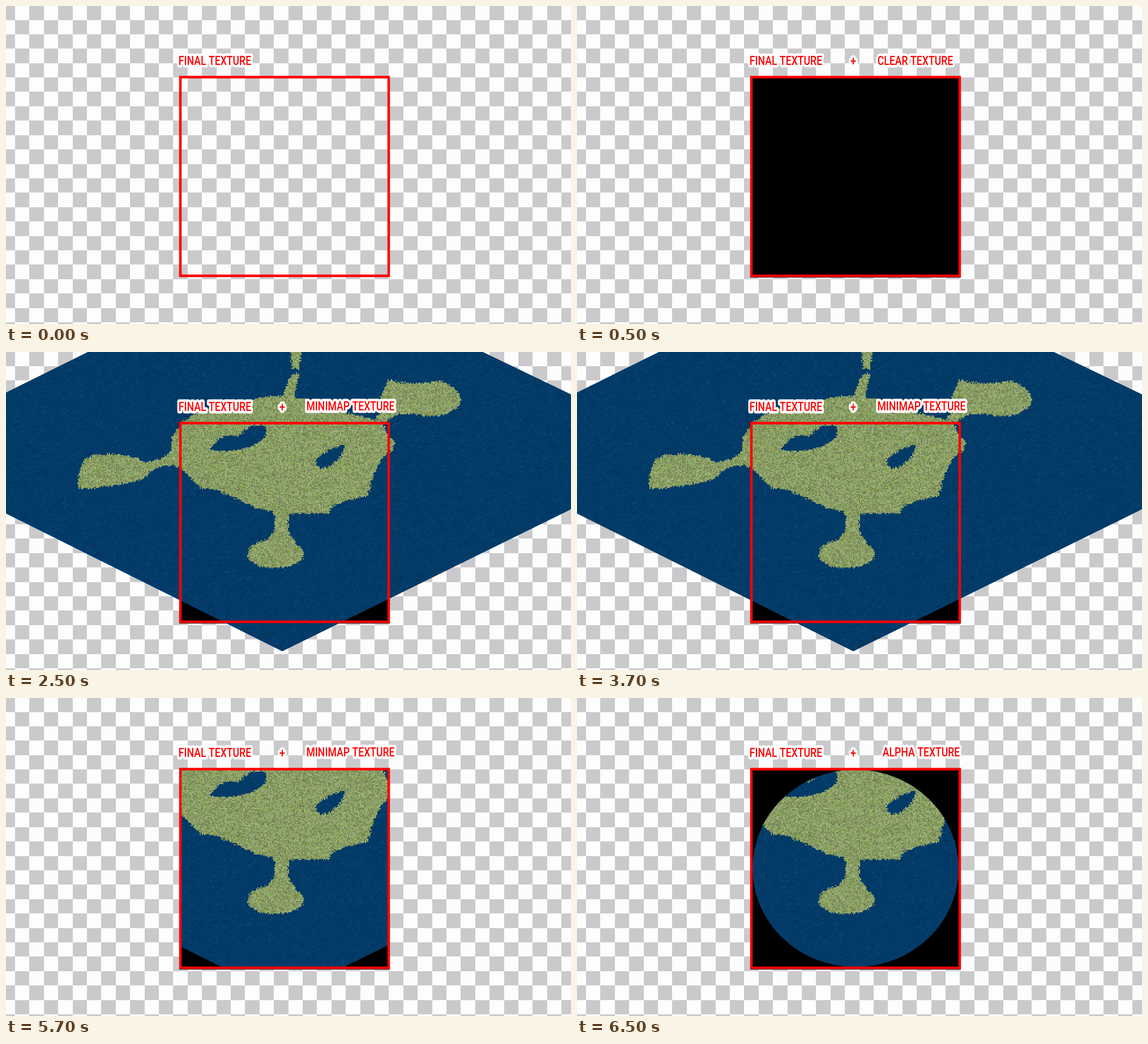
These frames come from a looping animation (998 px wide and 561 px high, 8 s). An HTML page with a canvas:

```html
<!DOCTYPE html>
<html lang="en">
<head>
<meta charset="utf-8">
<title>Minimap texture steps</title>
<style>
html, body { margin: 0; width: 100%; height: 100%; overflow: hidden; background: #fdfdfd; }
canvas { display: block; }
</style>
</head>
<body>
<canvas id="stage" width="998" height="561"></canvas>
<script>
const W = 998, H = 561, RED = '#fe0000';
const ctx = document.getElementById('stage').getContext('2d');

let seed = 7;
const rnd = () => (seed = (seed * 16807) % 2147483647) / 2147483647;
const shape = d => new Path2D(d);

function layer(paint) {
  const c = document.createElement('canvas');
  c.width = W;
  c.height = H;
  paint(c.getContext('2d'));
  return c;
}

const diamond = shape('M488 -170 L1207 175 L488 528 L-215 178Z');
const land = [
  // mainland
  'M345 103 L400 90 L470 77 L530 82 L605 108 L662 122 L677 149 L687 158 L684 172 L665 186' +
  'L650 215 L639 254 L600 262 L575 273 L570 285 L500 286 L471 281 L440 275 L395 253 L365 241' +
  'L345 240 L308 205 L290 198 L293 150 L310 125Z',
  // west and east lobes
  'M127 240 Q125 185 160 182 Q215 175 245 195 Q275 192 292 175 L300 200 Q262 198 245 223 Q225 232 145 241Z',
  'M650 118 Q672 104 661 80 L676 49 Q720 60 768 51 Q803 65 803 85 Q800 112 740 114 Q690 100 672 125Z',
  // south neck and lobe
  'M470 280 Q486 312 455 336 L512 336 Q489 310 502 284Z',
  'M426 356 A50 25 0 0 1 526 356 A50 25 0 0 1 426 356Z',
  // north neck and islet
  'M504 38 L518 38 L509 80 L488 80Z',
  'M503 -2 L522 -2 L518 30 L505 30Z'
].map(shape);
const lakes = [
  'M360 172 Q380 142 410 148 Q440 120 459 133 Q464 158 425 168 Q400 180 360 172Z',
  'M548 190 Q570 168 597 165 Q600 180 577 198 Q550 215 548 190Z'
].map(shape);

function paintWater(c) {
  c.fillStyle = '#033b68';
  c.fillRect(0, 0, W, H);
  for (let i = 0; i < 15000; i++) {
    const x = rnd() * W, y = rnd() * H, len = 2 + rnd() * 4;
    c.strokeStyle = i % 2 ? 'rgba(35,92,136,.42)' : 'rgba(0,29,58,.4)';
    c.beginPath();
    c.moveTo(x, y);
    c.lineTo(x + len, y - len / 2);
    c.stroke();
  }
}

// Small cells sampled with jitter give the grass its ragged edge.
function paintGrass(c) {
  for (let y = 0; y < 390; y += 2)
    for (let x = 120; x < 810; x += 2) {
      const px = x + rnd() * 4 - 1, py = y + rnd() * 4 - 1;
      const inside = p => c.isPointInPath(p, px, py);
      if (!land.some(inside) || lakes.some(inside)) continue;
      c.fillStyle = `hsl(${72 + rnd() * 18},${15 + rnd() * 20}%,${40 + rnd() * 20}%)`;
      c.fillRect(x, y, 2, 2);
    }
}

const map = layer(c => {
  c.clip(diamond);
  paintWater(c);
  paintGrass(c);
});

const checker = layer(c => {
  const colX = k => Math.round(16 + k * 25.4), rowY = r => Math.round(r * 25.4 - 0.9);
  c.fillStyle = '#fdfdfd';
  c.fillRect(0, 0, W, H);
  c.fillStyle = '#cacacc';
  for (let r = 0; r < 23; r++)
    for (let k = r % 2 - 1; k < 39; k += 2)
      c.fillRect(colX(k), rowY(r), colX(k + 1) - colX(k), rowY(r + 1) - rowY(r));
});

function label(text, x, y) {
  ctx.save();
  ctx.translate(x, y);
  ctx.scale(0.785, 1); // condensed face
  ctx.font = '500 22.5px Roboto, Arial, sans-serif';
  ctx.textAlign = 'center';
  ctx.lineJoin = 'round';
  ctx.lineWidth = 9;
  ctx.strokeStyle = '#fff';
  ctx.strokeText(text, 0, 0);
  ctx.fillStyle = RED;
  ctx.fillText(text, 0, 0);
  ctx.restore();
}

function blackout(round) {
  ctx.beginPath();
  ctx.rect(306, 124, 372, 355);
  if (round) ctx.ellipse(492, 300.5, 182, 174, 0, 0, Math.PI * 2);
  ctx.fillStyle = '#000';
  ctx.fill('evenodd');
}

function drawMap(cropped) {
  ctx.save();
  if (cropped) {
    ctx.beginPath();
    ctx.rect(306, 124, 372, 354);
    ctx.clip();
  }
  ctx.drawImage(map, 0, 0);
  ctx.restore();
}

const steps = [
  { at: 0 },
  { at: 500, add: 'CLEAR TEXTURE', x: 597.5, y: 104 },
  { at: 2500, add: 'MINIMAP TEXTURE', x: 608.5, y: 103 },
  { at: 4500, add: 'MINIMAP TEXTURE', x: 608.5, y: 103 },
  { at: 6500, add: 'ALPHA TEXTURE', x: 608, y: 103 }
];

function draw(n) {
  const { add, x, y } = steps[n];
  ctx.drawImage(checker, 0, 0);
  if (n > 0) blackout(false);
  if (n > 1) drawMap(n > 2);
  if (n > 3) blackout(true);
  ctx.strokeStyle = RED;
  ctx.lineWidth = 4.5;
  ctx.strokeRect(308, 125.5, 368, 350.5);
  label('FINAL TEXTURE', 369, 104);
  if (add) {
    label('+', 488, 105);
    label(add, x, y);
  }
}

const begin = performance.now();
function tick() {
  const t = (performance.now() - begin) % 8000;
  draw(steps.filter(s => s.at <= t).length - 1);
  requestAnimationFrame(tick);
}
tick();
</script>
</body>
</html>
```
